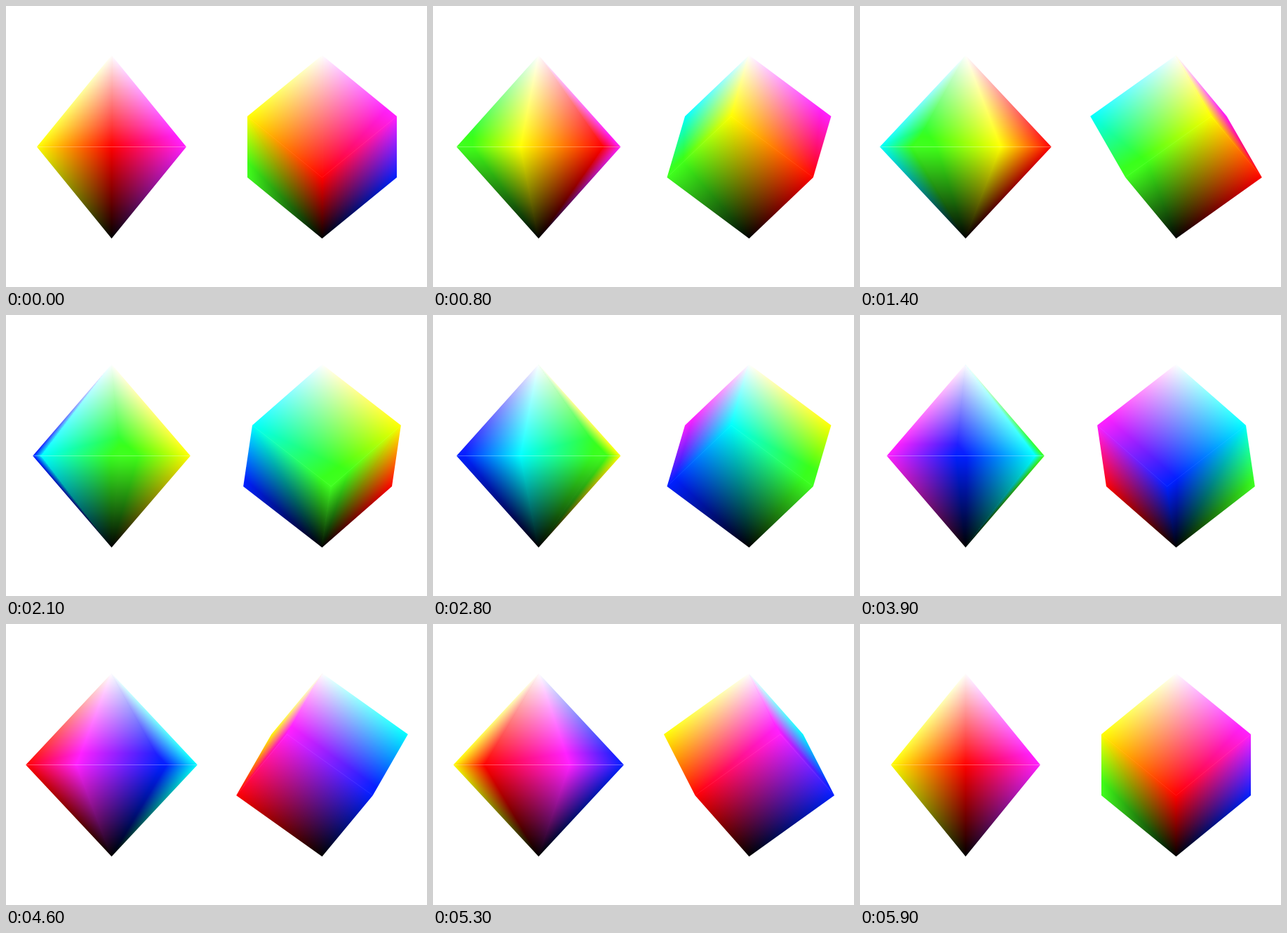
Animation, 600 px wide and 400 px high, one loop 6 s. Source, as an HTML page with a canvas:

```html
<!DOCTYPE html>
<html lang="en">
<head>
<meta charset="utf-8">
<title>Rotating colour solids</title>
<style>
  html, body { margin: 0; width: 100%; height: 100%; overflow: hidden; background: #fff; }
  canvas { display: block; }
</style>
</head>
<body>
<canvas id="stage" width="600" height="400"></canvas>
<script>
const W = 600, H = 400;
const CENTER_Y = 200.5, HALF = 130.5, RADIUS = 123;
const STEP = 100, STEPS = 60;
const WHITE = [255, 255, 255], BLACK = [0, 0, 0];
// Red, magenta, blue, cyan, green, yellow around the axis
const RING = [
  [255, 0, 0], [255, 0, 255], [0, 0, 255],
  [0, 255, 255], [0, 255, 0], [255, 255, 0]
];
// lift: how far the ring corners alternate above and below the middle
const SOLIDS = [
  { x: 150.5, lift: 0 },
  { x: 450.5, lift: HALF / 3 }
];

const ctx = document.getElementById('stage').getContext('2d');
const image = ctx.createImageData(W, H);
const px = image.data;

const cross = (a, b, x, y) => (b.x - a.x) * (y - a.y) - (b.y - a.y) * (x - a.x);
const span = (a, b) => Math.hypot(b.x - a.x, b.y - a.y);

// Softens the pure green, blue and magenta corners of the colour space
function setPixel(p, r, g, b) {
  px[p] = Math.max(r, (g - b) / 4);
  px[p + 1] = Math.max(g, b / 8);
  px[p + 2] = Math.max(b, (g - r) / 8);
  px[p + 3] = 255;
}

// Blends the corner colours over a triangle and one pixel around it
function triangle(a, b, c) {
  const area = cross(a, b, c.x, c.y);
  const size = Math.abs(area);
  const xs = [a.x, b.x, c.x], ys = [a.y, b.y, c.y];
  const left = Math.floor(Math.min(...xs)) - 1, right = Math.ceil(Math.max(...xs)) + 1;
  const top = Math.floor(Math.min(...ys)) - 1, bottom = Math.ceil(Math.max(...ys)) + 1;
  const padU = -span(b, c) / size, padV = -span(c, a) / size, padW = -span(a, b) / size;
  for (let y = top; y < bottom; y++) {
    for (let x = left; x < right; x++) {
      let u = cross(b, c, x + 0.5, y + 0.5) / area;
      let v = cross(c, a, x + 0.5, y + 0.5) / area;
      let w = 1 - u - v;
      if (u < padU || v < padV || w < padW) continue;
      u = Math.max(u, 0);
      v = Math.max(v, 0);
      w = Math.max(w, 0);
      const sum = u + v + w;
      const mix = k => (u * a.rgb[k] + v * b.rgb[k] + w * c.rgb[k]) / sum;
      setPixel((y * W + x) * 4, mix(0), mix(1), mix(2));
    }
  }
}

function ringPoints({ x, lift }, angle) {
  return RING.map((rgb, i) => ({
    x: x + RADIUS * Math.sin((angle + i * 60) * Math.PI / 180),
    y: CENTER_Y + (i % 2 ? -lift : lift),
    rgb
  }));
}

// Triangles that face the viewer, all wound the same way
function visibleFaces(solid, ring) {
  const top = { x: solid.x, y: CENTER_Y - HALF, rgb: WHITE };
  const bottom = { x: solid.x, y: CENTER_Y + HALF, rgb: BLACK };
  return ring.flatMap((p, i) => {
    const q = ring[(i + 1) % 6];
    return [[top, p, q], [bottom, q, p]];
  }).filter(([a, b, c]) => cross(a, b, c.x, c.y) < -1e-3);
}

function drawSeam(solid, ring) {
  if (!solid.lift) {
    const xs = ring.map(p => p.x);
    const left = Math.min(...xs);
    ctx.fillStyle = 'rgba(255,255,255,.3)';
    ctx.fillRect(left, 200, Math.max(...xs) - left, 1);
    return;
  }
  ctx.strokeStyle = 'rgba(255,255,255,.08)';
  ctx.beginPath();
  ring.forEach((p, i) => {
    const q = ring[(i + 1) % 6];
    if (q.x <= p.x) return;
    ctx.moveTo(p.x, p.y);
    ctx.lineTo(q.x, q.y);
  });
  ctx.stroke();
}

// Cuts the blended colours to a smooth outline on white
function trim(faces) {
  ctx.globalCompositeOperation = 'destination-in';
  ctx.fillStyle = '#000';
  ctx.beginPath();
  for (const [a, b, c] of faces) {
    ctx.moveTo(a.x, a.y);
    ctx.lineTo(b.x, b.y);
    ctx.lineTo(c.x, c.y);
    ctx.closePath();
  }
  ctx.fill();
  ctx.globalCompositeOperation = 'destination-over';
  ctx.fillStyle = '#fff';
  ctx.fillRect(0, 0, W, H);
  ctx.globalCompositeOperation = 'source-over';
}

// The last stretch of the turn runs slightly faster
const angleAt = n => n <= 46 ? n * 6 : 276 + (n - 46) * 84 / 13;

function draw(n) {
  const rings = SOLIDS.map(s => ringPoints(s, angleAt(n)));
  const faces = SOLIDS.flatMap((s, i) => visibleFaces(s, rings[i]));
  px.fill(0);
  faces.forEach(f => triangle(...f));
  ctx.putImageData(image, 0, 0);
  trim(faces);
  SOLIDS.forEach((s, i) => drawSeam(s, rings[i]));
}

const start = performance.now();
let shown = -1;

function tick() {
  const n = Math.floor((performance.now() - start) / STEP) % STEPS;
  if (n !== shown) draw(shown = n);
  requestAnimationFrame(tick);
}
tick();
</script>
</body>
</html>
```
